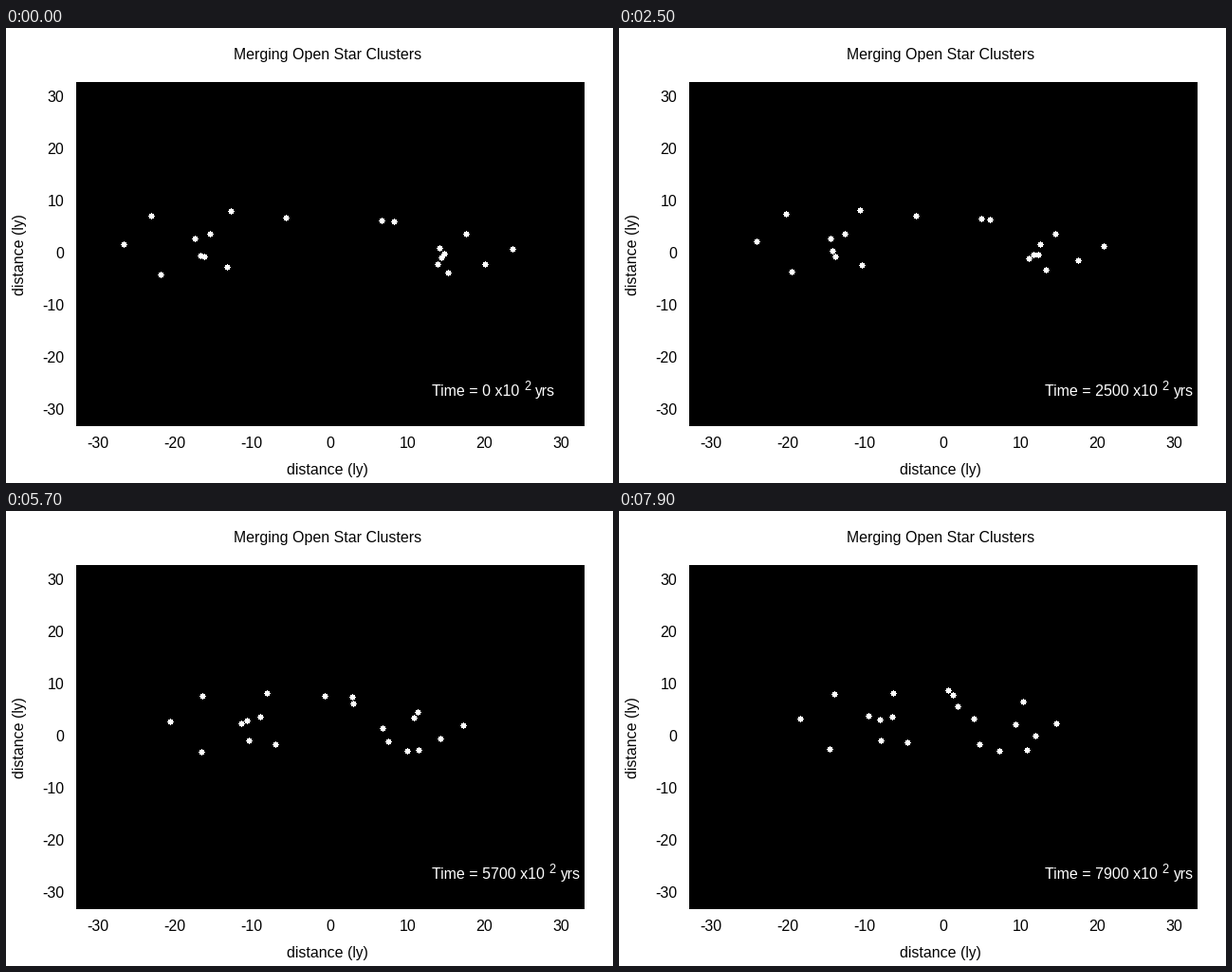
Recreate the animation shown at these times as a matplotlib script. Size 640x480 px, loop 8 s.

```python
import matplotlib.pyplot as plt
import numpy as np
from matplotlib.animation import FuncAnimation
from matplotlib.collections import PolyCollection

W, H, DPI = 640, 480, 100
FRAMES, STEP_MS = 80, 100
ZERO_X, ZERO_Y = 342.2, 237.5
FONT_PX = 16
DIGIT_W = FONT_PX * 0.556
FLYBY = 4  # frames a close encounter takes

plt.rcParams.update({"font.family": "Liberation Sans", "text.hinting": "default"})


class Star:
    """Drifts in a straight line; each close encounter (time, dvx, dvy) bends it."""

    def __init__(self, x, y, vx, vy, *kicks):
        self.start = np.array([x, y])
        self.speed = np.array([vx, vy])
        self.kicks = kicks

    def at(self, t):
        pos = self.start + self.speed * t
        for when, *dv in self.kicks:
            u = t - when
            pos = pos + np.array(dv) * (u + np.hypot(u, FLYBY)) / 2
        return pos


LEFT = [
    Star(124.2, 228, 0.85, -0.11),
    Star(153, 198, 0.94, -0.06),
    Star(163, 260, 0.75, -0.11),
    Star(199, 222, 0.96, -0.02),
    Star(215, 217, 0.93, 0),
    Star(233, 252, 0.90, -0.10),
    Star(237, 192.55, 0.66, -0.01),
    Star(295, 200, 0.72, -0.08),
    Star(205, 240, 0.90, 0.03),
    Star(209, 241, 0.55, -0.05, (8, 0.15, -0.29)),
]
RIGHT = [
    Star(534, 233, -0.92, -0.12),
    Star(505, 249, -0.83, -0.15),
    Star(396, 203, -0.56, -0.08, (40, 0.14, 0.24)),
    Star(409, 204, -0.73, -0.08, (40, -0.12, -0.22)),
    Star(485, 217, -1.02, -0.02, (50, 0.47, 0.33)),
    Star(457, 232, -0.56, -0.05, (20, 0.23, -0.46)),
    Star(462, 238, -0.90, -0.04, (23, 0.70, 0.64), (47, 0, -0.58)),
    Star(459, 242, -0.85, -0.17, (22, -0.21, 0.30)),
    Star(455, 249, -0.88, -0.12, (18, -0.19, -0.34)),
    Star(466, 258, -0.62, -0.14, (38, -0.39, 0.15)),
]


def dot_outline():
    """Seven-pixel dot: a 5x5 block with a nub on each side."""
    quarter = [0.5 - 3.5j, 0.5 - 2.5j, 2.5 - 2.5j, 2.5 - 0.5j, 3.5 - 0.5j]
    ring = np.array([p * 1j ** k for k in range(4) for p in quarter])
    return np.column_stack([ring.real, ring.imag])


fig = plt.figure(figsize=(W / DPI, H / DPI), dpi=DPI, facecolor="white")
ax = fig.add_axes([0, 0, 1, 1])
ax.set(xlim=(0, W), ylim=(H, 0))
ax.axis("off")


def label(x, y, text="", px=FONT_PX, **kw):
    return ax.text(x, y, text, fontsize=px * 72 / DPI, va="baseline", **kw)


ax.add_patch(plt.Rectangle((74, 57), 536, 363, fc="black", lw=0))
label(339.5, 33, "Merging Open Star Clusters", ha="center")
label(339, 471, "distance (ly)", ha="center")
label(19, 239.5, "distance (ly)", ha="center", rotation=90, rotation_mode="anchor")
for v in range(-30, 31, 10):
    label(ZERO_X + 8.1 * v - (2.5 if v < 0 else 0), 443, str(v), ha="center")
    label(61.2, ZERO_Y - 5.5 * v + 5.5, str(v), ha="right")

clock = label(449, 388, color="white")
power = label(0, 382, "2", px=0.8 * FONT_PX, color="white")
unit = label(0, 388, "yrs", color="white")

DOT = dot_outline()
stars = PolyCollection([], facecolors="white", linewidths=0)
ax.add_collection(stars, autolim=False)


def draw(n):
    # Dots sit on whole pixels
    stars.set_verts([DOT + np.round(s.at(n)) + 0.5 for s in LEFT + RIGHT])
    years = str(n * 100)
    clock.set_text(f"Time = {years} x10")
    shift = DIGIT_W * (len(years) - 1)
    power.set_x(546 + shift)
    unit.set_x(558 + shift)
    return stars, clock, power, unit


anim = FuncAnimation(fig, draw, frames=FRAMES, interval=STEP_MS,
                     repeat=True, repeat_delay=0)
plt.show()
```
